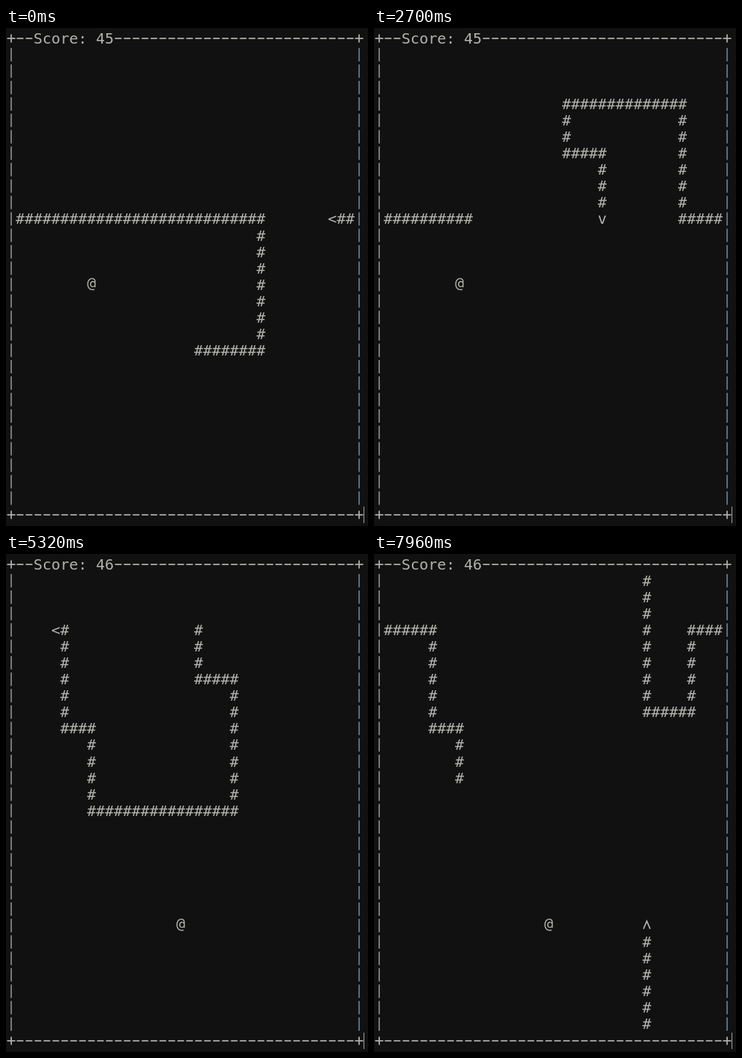
Recreate the animation shown at these times as an HTML page with a canvas. Size 487 by 669 pixels, loop 7990 ms.

```html
<!DOCTYPE html>
<html lang="en">
<head>
<meta charset="utf-8">
<title>Terminal snake</title>
<style>
  html, body { margin: 0; width: 100%; height: 100%; overflow: hidden; background: #111; }
  canvas { display: block; }
</style>
</head>
<body>
<canvas id="stage" width="487" height="669"></canvas>
<script>
const ctx = document.getElementById('stage').getContext('2d');
const LOOP = 7990, COLS = 38, ROWS = 28;
const INK = '#b2b2ae', WALL = '#92928f', RIGHT_WALL = '#6d8498';
const START_LENGTH = 46, EAT_STEP = 53;

// The snake's whole route, from its first tail cell to its last head cell.
const ROUTE = 'R7 U8 L32 U7 L13 D3 R4 D8 L16 U5 L3 U6 L9 D5 L5 U15';
const MOVES = { L: [-1, 0, '<'], R: [1, 0, '>'], U: [0, -1, '^'], D: [0, 1, 'v'] };

// [step, time in ms]; steps between two entries are evenly spaced.
const PACE = [[0, 0], [1, 100], [21, 1670], [22, 1770], [32, 2570], [43, 3420], [56, 4410],
              [69, 5390], [82, 6420], [95, 7470], [96, 7570], [101, 7960]];

const wrap = (n, size) => (n - 1 + size) % size + 1;
const colX = c => 7 + 12 * c;
const rowY = r => 13.8 + 22.06 * r;

const path = [{ c: 21, r: 19, head: '>' }];
for (const run of ROUTE.split(' ')) {
  const [dc, dr, head] = MOVES[run[0]];
  for (let i = +run.slice(1); i > 0; i--) {
    const { c, r } = path[path.length - 1];
    path.push({ c: wrap(c + dc, COLS), r: wrap(r + dr, ROWS), head });
  }
}

function stepAt(t) {
  for (let i = 1; i < PACE.length; i++) {
    const [s0, t0] = PACE[i - 1], [s1, t1] = PACE[i];
    if (t < t1) return Math.floor(s0 + (s1 - s0) * (t - t0) / (t1 - t0) + 1e-6);
  }
  return PACE[PACE.length - 1][0];
}

function glyph(char, c, r) {
  const x = colX(c), y = rowY(r);
  if (char === '^') {
    ctx.beginPath();
    ctx.moveTo(x - 4.5, y + 4.5);
    ctx.lineTo(x, y - 6);
    ctx.lineTo(x + 4.5, y + 4.5);
    ctx.stroke();
  } else {
    ctx.fillText(char, x, y + (char === '@' ? 4 : 7));
  }
}

function bar(x, y, w, h, color) {
  ctx.fillStyle = color;
  ctx.fillRect(x - w / 2, y - h / 2, w, h);
}

function drawFrame(score) {
  for (const r of [0, ROWS + 1]) {
    for (let c = 0; c <= COLS + 1; c++) {
      if (r === 0 && c > 2 && c < 12) continue;
      const corner = c === 0 || c > COLS, y = Math.round(rowY(r));
      bar(colX(c), y, corner ? 11 : 9, 1.7, INK);
      if (corner) bar(colX(c), y, 1.7, 11, INK);
    }
  }
  for (let r = 1; r <= ROWS; r++) {
    bar(colX(0), rowY(r), 1.6, 18, WALL);
    bar(colX(COLS + 1), rowY(r), 1.6, 18, RIGHT_WALL);
  }
  ctx.fillStyle = INK;
  [...`Score: ${score}`].forEach((char, i) => glyph(char, 3 + i, 0));
}

function draw(t) {
  const step = stepAt(t), fed = step >= EAT_STEP;
  const head = START_LENGTH - 1 + step;
  const tail = head + 1 - START_LENGTH - (fed ? 1 : 0);

  ctx.fillStyle = '#111';
  ctx.fillRect(0, 0, 487, 669);
  ctx.font = '20px "DejaVu Sans Mono", monospace';
  ctx.textAlign = 'center';
  ctx.strokeStyle = INK;
  ctx.lineWidth = 1.6;

  drawFrame(fed ? 46 : 45);
  for (let i = tail; i <= head; i++) {
    const cell = path[i];
    glyph(i === head ? cell.head : '#', cell.c, cell.r);
  }
  if (fed) glyph('@', 19, 22);
  else glyph('@', 9, 15);

  const cursorHidden = t >= 6350 && t < 6380;
  if (!cursorHidden) bar(481.5, 654, 1, 22, '#a0a0a0');
}

function tick() {
  draw(performance.now() % LOOP);
  requestAnimationFrame(tick);
}
tick();
</script>
</body>
</html>
```
